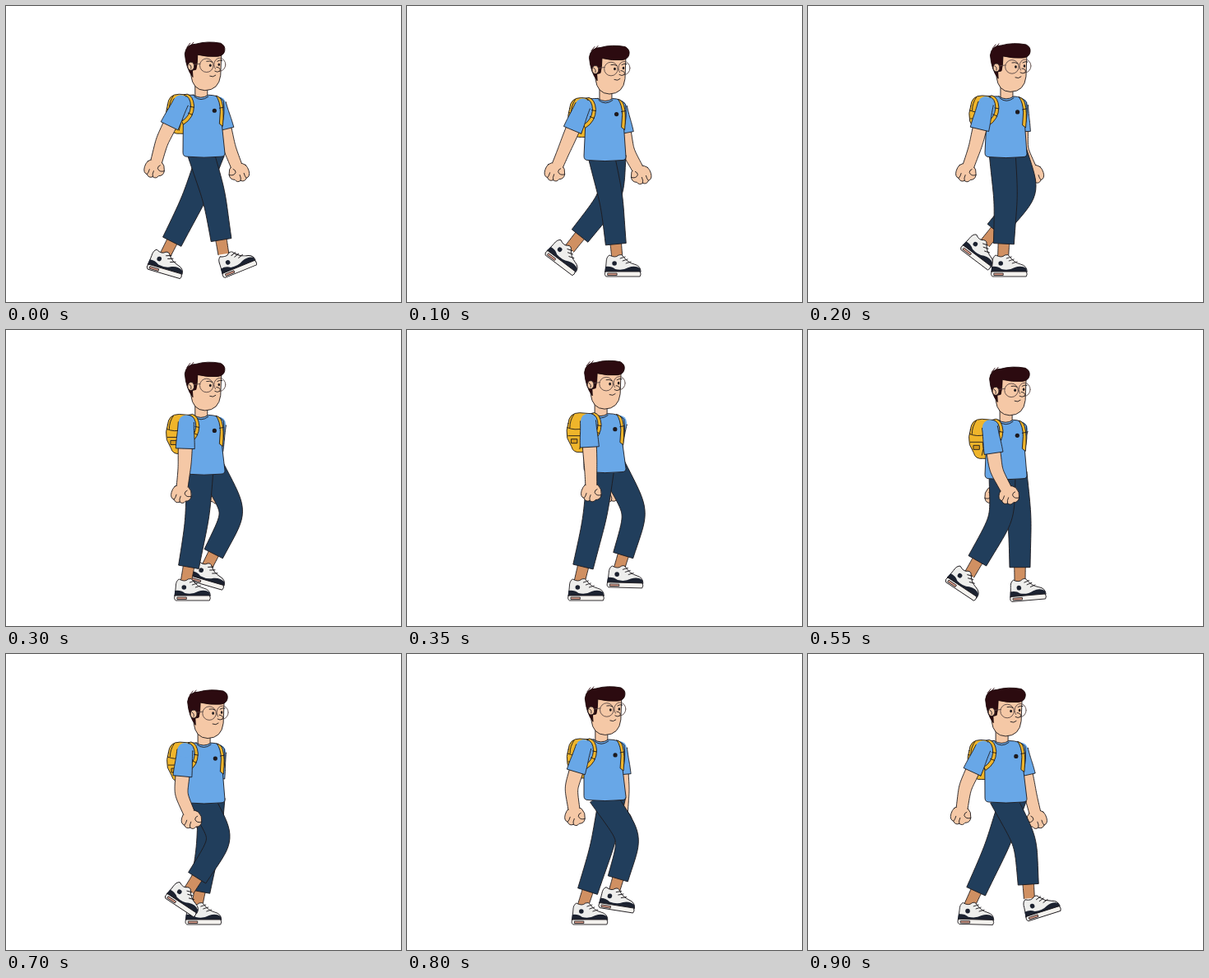
An HTML page with a canvas for the animation above (950 ms loop, 480 px wide and 360 px high).

```html
<!DOCTYPE html>
<html lang="en">
<head>
<meta charset="utf-8">
<title>Walk cycle</title>
<style>
  html, body { margin: 0; width: 100%; height: 100%; overflow: hidden; background: #fff; }
  canvas { display: block; width: 480px; height: 360px; }
</style>
</head>
<body>
<canvas id="stage" width="480" height="360"></canvas>
<script>
const ctx = document.getElementById('stage').getContext('2d');
const LOOP = 950, STEP = 50;
const INK = '#1d1a1e', SKIN = '#f5c8a6', SHIRT = '#68a7e7', PANTS = '#213e5c',
      HAIR = '#2c0b10', BAG = '#efb52b', SOCK = '#d09062';
const { sin, cos, min, max, PI } = Math;

const rad = deg => deg * PI / 180;
const mix = (a, b, u) => [a[0] + (b[0] - a[0]) * u, a[1] + (b[1] - a[1]) * u];
const polar = (p, len, deg) => [p[0] + len * sin(rad(deg)), p[1] + len * cos(rad(deg))];
// Cosine that peaks at `peak` ms and repeats `times` per loop.
const wave = (t, peak, times = 1) => cos(2 * PI * times * (t - peak) / LOOP);

// The body bobs once per step, with a slight limp.
const headAt = t => [3.5 * wave(t, 150, 2) - .8, 4.5 * wave(t, 125, 2) + 1.5 * wave(t, 0) - .9];
const hemAt = t => 180 + 5 * wave(t, 125, 2) + 3.6 * wave(t, 0);
const nearShoulder = t => 217 - 4.5 * wave(t, 0);

// The foot slides back on the ground, then swings forward and overshoots a little.
function footX(t) {
  const p = t / LOOP, front = 280, stride = 85;
  if (p < .5) return front - stride * p * 2;
  const k = ((p - .5) * 2) ** 1.3;
  return front - stride + stride * (k * k * (3 - 2 * k) - k * (1 - k) * (1 - 2 * k));
}
// From heel lift to flat landing: toe down first, then toe up.
function footPose(t) {
  const w = min(1, ((t - 420 + LOOP) % LOOP) / 615);
  return {
    x: footX(t),
    y: 316 - 19 * max(0, sin(PI * w)) ** 1.5,
    tilt: 40 * sin(1.5 * PI * w) * (1 - w ** 8)
  };
}

function shape(d, fill, line = INK, width = .9) {
  const p = d instanceof Path2D ? d : new Path2D(d);
  if (fill) { ctx.fillStyle = fill; ctx.fill(p); }
  if (line) { ctx.strokeStyle = line; ctx.lineWidth = width; ctx.stroke(p); }
}
function oval(x, y, rx, ry, fill, line = INK, width = .9) {
  const p = new Path2D();
  p.ellipse(x, y, rx, ry, 0, 0, 7);
  shape(p, fill, line, width);
}
function at(x, y, deg, draw) {
  ctx.save();
  ctx.translate(x, y);
  ctx.rotate(rad(deg));
  draw();
  ctx.restore();
}

// Tube from a to c, bent at b, tapering from width w0 to w1.
function limb(a, b, c, w0, w1, fill, closed) {
  const p = mix(a, b, 1.1), q = mix(c, b, 1.1), left = [], right = [], N = 20;
  for (let i = 0; i <= N; i++) {
    const u = i / N, pq = mix(p, q, u);
    const m = mix(mix(a, p, u), pq, u), n = mix(pq, mix(q, c, u), u);
    const [x, y] = mix(m, n, u), dx = n[0] - m[0], dy = n[1] - m[1];
    const half = (w0 + (w1 - w0) * u) / 2 / (Math.hypot(dx, dy) || 1);
    left.push([x + dy * half, y - dx * half]);
    right.unshift([x - dy * half, y + dx * half]);
  }
  const body = new Path2D(), sides = new Path2D();
  [...left, ...right].forEach(v => body.lineTo(...v));
  body.closePath();
  left.forEach(v => sides.lineTo(...v));
  sides.moveTo(...right[0]);
  right.forEach(v => sides.lineTo(...v));
  shape(body, fill, closed ? INK : null);
  if (!closed) shape(sides, null);
}

function drawShoe() {
  shape('M-21 7L-20 -4Q-20 -11 -16 -13Q-9 -9 -5 -13Q-1 -15 1 -11Q6 -4 14 -2Q22 0 22 7Z', '#eeeeec');
  shape('M-21 1Q-14 0 -9 4Q0 6 7 2Q15 -1 21 3L22 8L-22 8Z', '#1c2230', null);
  shape('M-21 7H21Q23 10 21 13H-20Q-23 11 -21 7Z', '#f4f2ee');
  shape('M-18 9H-7V11.5H-18Z', '#d99a86', INK, .8);
  shape('M-3 -9L3 -11M0 -6L6 -8M4 -3L10 -5', null);
  oval(-10, -3, 2.8, 2.8, '#1c2230', null);
}

function drawLeg(t, hip) {
  const foot = footPose(t);
  const ankle = [foot.x - 7 + .42 * foot.tilt, foot.y - 13];
  const knee = mix(hip, ankle, .45);
  knee[0] += 4 + 28 * max(0, wave(t, 715));
  const cuff = mix(knee, ankle, .8);
  limb(mix(cuff, knee, .1), cuff, mix(cuff, ankle, 1.3), 14, 13, SOCK);
  at(foot.x, foot.y, foot.tilt, drawShoe);
  limb(hip, knee, cuff, 32, 25, PANTS, true);
}

function drawArm(t, shoulder, lean, flip) {
  const elbow = polar(shoulder, 53, lean - 18 * wave(t, 10));
  const bend = 3 - 26 * wave(t, 120);
  const hand = polar(elbow, 34, bend), wrist = polar(elbow, 25, bend);
  const end = mix(shoulder, elbow, .6);
  at(...hand, 0, () => {
    ctx.scale(flip, 1);
    shape('M-8 -9Q0 -14 8 -9Q13 -4 12 3Q11 9 5 9Q2 13 -2 10Q-7 12 -9 7Q-14 5 -12 -2Q-11 -6 -8 -9Z', SKIN);
    shape('M-6 1Q-7 5 -9 7M-1 3Q-3 7 -2 10M12 3Q6 5 4 0Q4 -3 7 -4', null);
  });
  limb(end, elbow, wrist, 17, 14, SKIN);
  limb(shoulder, mix(shoulder, end, .5), end, 19, 23, SHIRT, true);
  oval(shoulder[0], shoulder[1], 9, 9, SHIRT, null);
}

function drawBag() {
  shape('M197 120Q198 107 211 107L224 108V155H212Q203 156 201 148L196 138Q194 128 197 120Z', BAG);
  shape('M196 125Q205 129 215 126M197 135H212Q214 143 211 151M204 109Q199 116 199 125', null);
  shape('M201 139H208V144H201Z', '#d79a1c');
}

function drawTorso(t, hx, hy, hem) {
  const s = hx * .3, y = v => v + hy;
  at(hx, hy, 0, () => shape('M232 95V110Q239 115 247 110V95Z', SKIN));
  shape(`M${230 + hx} ${y(108)}Q${239 + hx} ${y(114)} ${248 + hx} ${y(108)}
    Q${259 + s} ${y(108)} ${265 + s} ${y(115)}Q${267 + s} ${y(132)} ${263 + s} ${y(144)}
    L266 ${hem - 4}Q266 ${hem} 261 ${hem}Q241 ${hem + 2} 220 ${hem}Q215 ${hem} 215 ${hem - 5}
    L${216 + s} ${y(144)}Q${211 + s} ${y(125)} ${215 + s} ${y(113)}Q${221 + s} ${y(107)} ${230 + hx} ${y(108)}Z`, SHIRT);
  at(hx, hy, 0, () => shape('M231 110Q239 117 248 110', null));
  at(s, hy, 0, () => {
    oval(254, 127, 2.6, 2.6, INK, null);
    shape('M256 109Q261 116 261 128L260 143L264 146Q266 126 263 116Q261 110 256 109Z', BAG);
    shape('M260 124L265 123', null);
  });
  at(nearShoulder(t) - 213, hy, 0, () => {
    shape('M217 108Q225 110 225 122Q224 134 214 140L216 144Q229 136 229 121Q228 109 221 107Z', BAG);
    shape('M224 122L229 123M222 130L227 132', null);
  });
}

function drawHead() {
  shape('M228 58L227 84Q229 102 244 102.5Q261 102 263 84L264 56Z', SKIN);
  shape('M229 86Q221 76 219.5 58Q221 46 233 46Q247 42 263 45Q269 48 268 54Q267 60 260 61Q247 62 235 59Q235 70 233 77L229 78Z', HAIR, '#1a0709');
  shape('M222 50L226 45M226 49L230 44', null, HAIR);
  oval(227, 73, 4, 5, SKIN);
  shape('M225 71Q228 72 227 76', null);
  shape('M231 71L238 70', null, '#5a4844');
  oval(246, 72, 8.3, 8.3, null, '#5a4844');
  oval(262, 71, 7, 8, null, '#5a4844');
  shape('M258 74Q264 75 262 79Q259 81 256 79', SKIN);
  oval(250.5, 72, 1.4, 1.8, INK, null);
  oval(261, 71, 1.3, 1.8, INK, null);
  shape('M246 67Q250 66 253 68M259 67Q262 65 265 66', null);
  shape('M250 85Q254 87 257 84', null);
}

function draw(t) {
  ctx.fillStyle = '#fff';
  ctx.fillRect(0, 0, 480, 360);
  ctx.lineJoin = ctx.lineCap = 'round';
  const [hx, hy] = headAt(t), hem = hemAt(t);
  const opposite = (t + LOOP / 2) % LOOP;
  at(hx * .3, hy, 0, drawBag);
  drawArm(opposite, [258, 119 + hy], -4, -1);
  drawLeg(opposite, [250, hem - 6]);
  drawLeg(t, [236, hem - 6]);
  drawTorso(t, hx, hy, hem);
  drawArm(t, [nearShoulder(t), 117 + hy], -8, 1);
  at(hx, hy, 0, drawHead);
}

function frame() {
  draw(Math.floor(performance.now() / STEP) * STEP % LOOP);
  requestAnimationFrame(frame);
}
frame();
</script>
</body>
</html>
```
